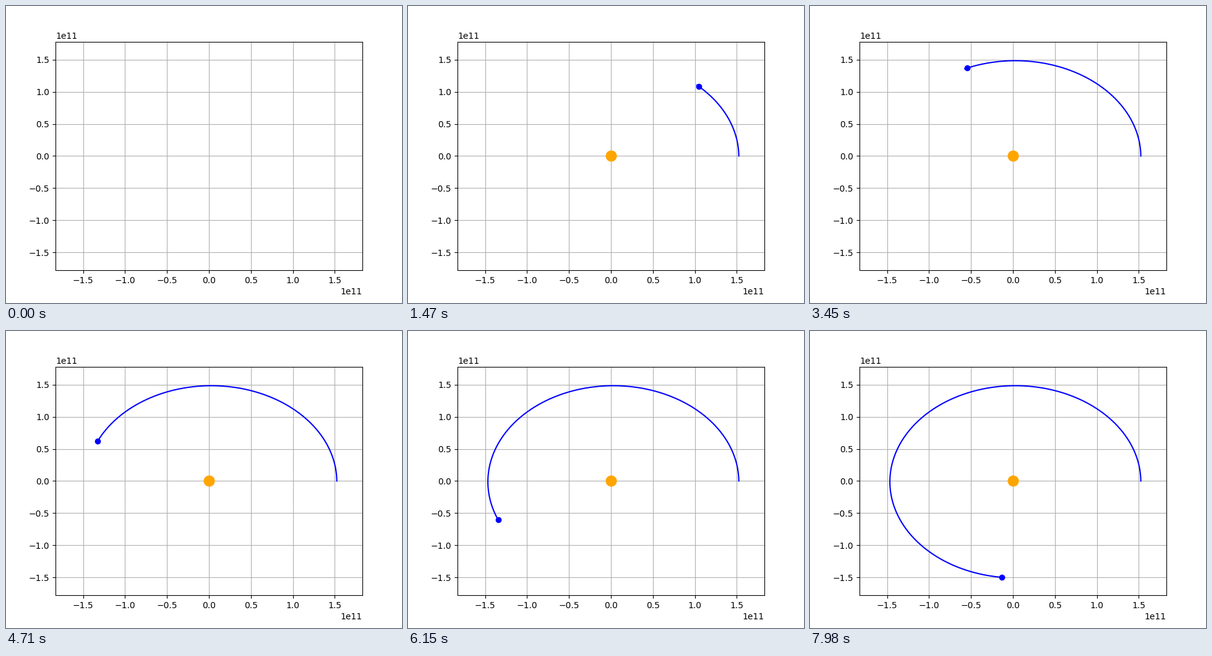
A matplotlib script that plays this animation: 640x480 px, repeating every 8000 ms.

```python
import numpy as np
import matplotlib.pyplot as plt
from matplotlib.animation import FuncAnimation

G = 6.67e-11
SUN_MASS = 2.0e30
AU = 1.5e11
DAY = 24 * 60 * 60
APHELION = 1.0167 * AU
APHELION_SPEED = 29290

FRAMES = 267
LOOP_MS = 8000


def orbit(days):
    """Daily positions of the planet, velocity updated before position."""
    pos = np.array([APHELION, 0.0])
    vel = np.array([0.0, APHELION_SPEED])
    path = [pos]
    for _ in range(days):
        vel = vel - G * SUN_MASS * pos / np.hypot(*pos) ** 3 * DAY
        pos = pos + vel * DAY
        path.append(pos)
    return np.array(path).T


xs, ys = orbit(365)

fig, ax = plt.subplots(figsize=(6.4, 4.8), dpi=100)
ax.grid(True)
ax.set_xlim(-1.2 * xs.max(), 1.2 * xs.max())
ax.set_ylim(-1.2 * ys.max(), 1.2 * ys.max())

trail, = ax.plot([], [], color="blue", lw=1.5)
planet, = ax.plot([], [], "o", color="blue", ms=6)
sun, = ax.plot([], [], "o", color="orange", ms=12)


def update(i):
    # The stage is empty at first; then the trail leads the planet by a day.
    n = i + 1 if i else 0
    trail.set_data(xs[:n], ys[:n])
    planet.set_data(xs[i - 1:i] if i else [], ys[i - 1:i] if i else [])
    sun.set_data([0] if i else [], [0] if i else [])
    return trail, planet, sun


def reset():
    return update(0)


anim = FuncAnimation(fig, update, frames=FRAMES, init_func=reset,
                     interval=LOOP_MS / FRAMES, repeat=True, repeat_delay=0)
plt.show()
```
